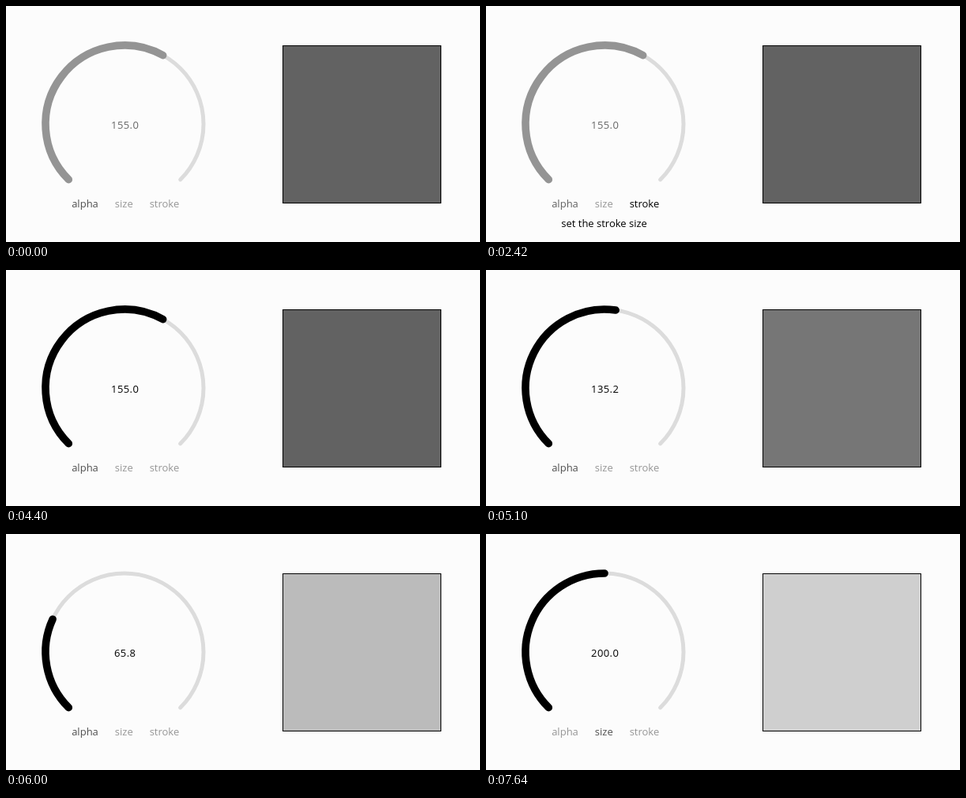
An HTML page that plays this animation: 600x300 px, repeating every 8000 ms.

```html
<!DOCTYPE html>
<html lang="en">
<head>
<meta charset="utf-8">
<title>Dial control</title>
<style>
  html, body { margin: 0; width: 100%; height: 100%; overflow: hidden; background: #fcfcfc; }
  svg { display: block; width: 600px; height: 300px; }
  text { font: 13px "Open Sans", "Noto Sans", sans-serif; text-anchor: middle; }
  path { fill: none; stroke-linecap: round; }
  #value { letter-spacing: .4px; }
</style>
</head>
<body>
<svg viewBox="0 0 600 300">
  <rect width="600" height="300" fill="#fcfcfc"/>
  <path id="track" stroke="#dcdcdc" stroke-width="5"/>
  <path id="bar" stroke-width="9.6"/>
  <text id="value" x="150.7" y="156"></text>
  <text id="alpha" x="100" y="256">alpha</text>
  <text id="size" x="149.3" y="256">size</text>
  <text id="stroke" x="200.4" y="256">stroke</text>
  <text id="hint" x="149.6" y="281"></text>
  <rect id="box" x="350.5" y="50.5" width="200" height="200" stroke="#000"/>
</svg>
<script>
const LOOP = 8000, STEP = 20;
const $ = id => document.getElementById(id);

const hints = {
  alpha: "set the rect alpha",
  size: "set the size value",
  stroke: "set the stroke size"
};

// what the pointer is over, from each time on
const hovers = [
  [0, ""], [580, "alpha"], [1400, ""], [2400, "size"], [2420, "stroke"],
  [3840, ""], [3940, "alpha"], [4400, "dial"], [7180, "size"], [7640, "dial"]
];

// the drag: time, alpha
const drag = [
  [4760, 155], [4780, 155.8], [4860, 153.6], [5100, 135.2],
  [5540, 100.1], [6000, 65.8], [6360, 46.3]
];

function slope(i) {
  if (i < 2 || i === drag.length - 1) return i < 2 ? 0 : -.04;
  const a = drag[i - 1], b = drag[i + 1];
  return (b[1] - a[1]) / (b[0] - a[0]);
}

function alphaAt(t) {
  if (t <= drag[0][0]) return drag[0][1];
  const i = drag.findIndex(p => t < p[0]) - 1;
  if (i < 0) return drag[drag.length - 1][1];
  const [t0, v0] = drag[i], [t1, v1] = drag[i + 1];
  const d = t1 - t0, u = (t - t0) / d, w = 1 - u;
  return v0 * w * w * (1 + 2 * u) + v1 * u * u * (3 - 2 * u)
    + d * u * w * (w * slope(i) - u * slope(i + 1));
}

function arc(part) {
  const point = deg => {
    const a = deg * Math.PI / 180;
    return (150 + 100 * Math.cos(a)).toFixed(2) + " " + (150 + 100 * Math.sin(a)).toFixed(2);
  };
  const sweep = 270 * part;
  return `M${point(135)}A100 100 0 ${sweep > 180 ? 1 : 0} 1 ${point(135 + sweep)}`;
}

function labelColor(name, hover, active, t) {
  if (name === hover) return "#000";
  if (name !== active) return "#969696";
  return t >= 1400 && t < 3940 ? "#626262" : "#505050";
}

function draw(ms) {
  const t = Math.floor(ms % LOOP / STEP) * STEP;
  const hover = hovers.filter(h => h[0] <= t).pop()[1];
  const active = t < 7440 ? "alpha" : "size";
  const alpha = alphaAt(t);
  const [value, max] = active === "alpha" ? [alpha, 255] : [200, 400];
  const onDial = hover === "dial";

  $("bar").setAttribute("d", arc(value / max));
  $("bar").setAttribute("stroke", onDial ? "#000" : "#949494");
  $("value").textContent = value.toFixed(1);
  $("value").setAttribute("fill", onDial ? "#000" : "#666");
  for (const name in hints) $(name).setAttribute("fill", labelColor(name, hover, active, t));
  $("hint").textContent = hints[hover] || "";
  $("box").setAttribute("fill-opacity", alpha / 255);
}

$("track").setAttribute("d", arc(1));
const start = performance.now();
function tick() {
  draw(performance.now() - start);
  requestAnimationFrame(tick);
}
tick();
</script>
</body>
</html>
```
